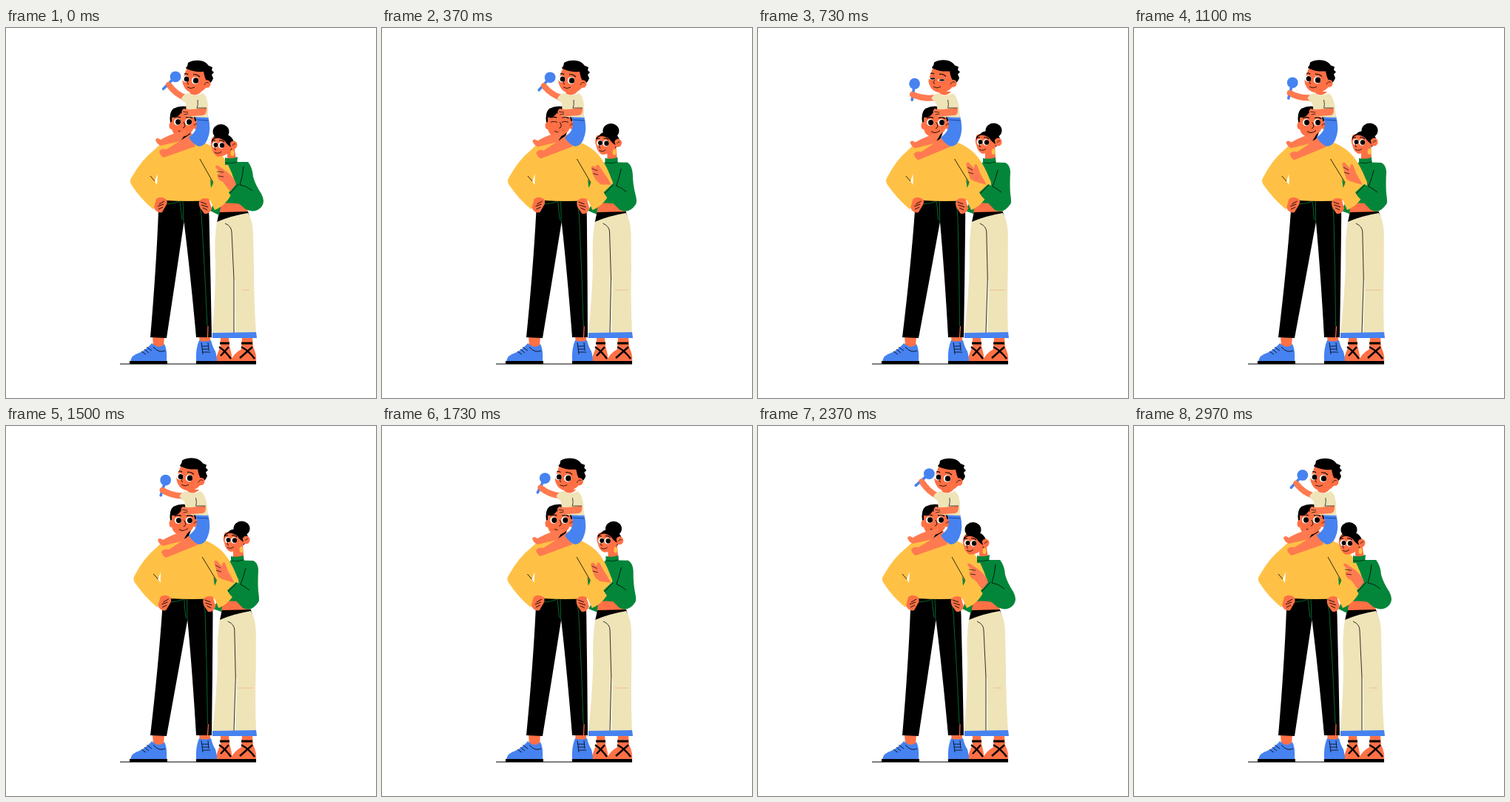
Write an HTML page with a canvas that moves like this. It is 500x500 px and loops after 3 s.

```html
<!DOCTYPE html>
<html lang="en">
<head>
<meta charset="utf-8">
<title>Family</title>
<style>
html, body { margin: 0; width: 100%; height: 100%; overflow: hidden; background: #fff; }
canvas { display: block; width: 500px; height: 500px; }
</style>
</head>
<body>
<canvas id="stage" width="500" height="500"></canvas>
<script>
const ctx = document.getElementById('stage').getContext('2d');
const SKIN = '#ff7045', LIMB = '#ff7a50', YELLOW = '#ffc145', BLUE = '#4682f0', GREEN = '#03863a',
      CREAM = '#efe4b8', BLACK = '#000', WHITE = '#fff';
const LOOP = 3000;

const clamp = v => Math.max(0, Math.min(1, v));
const ease = (t, a, b) => { const p = clamp((t - a) / (b - a)); return p * p * (3 - 2 * p); };
const hold = (t, a, b, c, d) => ease(t, a, b) - ease(t, c, d);
const lerp = (a, b, k) => a + (b - a) * k;

// Blend two paths that share the same commands.
function mix(a, b, k) {
  const to = b.match(/[\d.]+/g);
  let i = 0;
  return a.replace(/[\d.]+/g, n => lerp(+n, +to[i++], k));
}

// The current pose moves every point of the shapes drawn with it.
const still = (x, y) => [x, y];
let pose = still;
const place = d => new Path2D(d.replace(/([\d.]+) ([\d.]+)/g, (_, x, y) => pose(+x, +y).join(' ')));

function fill(color, d) {
  ctx.fillStyle = color;
  ctx.fill(place(d));
}
function line(d, width = 0.8, color = BLACK) {
  ctx.strokeStyle = color;
  ctx.lineWidth = width;
  ctx.stroke(place(d));
}
function oval(color, x, y, rx, ry = rx, turn = 0) {
  [x, y] = pose(x, y);
  ctx.fillStyle = color;
  ctx.beginPath();
  ctx.ellipse(x, y, rx, ry, turn, 0, 7);
  ctx.fill();
}
function eye(x, y, r, open) {
  if (open < 0.15) return line(`M${x - r} ${y} Q${x} ${y - 2} ${x + r} ${y}`);
  oval(WHITE, x - 0.4, y, r, r * open);
  oval(BLACK, x + 0.5, y, r * 0.76, r * 0.8 * open);
}

function feet() {
  pose = still;
  line('M154 454 L338 454', 1);
  fill(SKIN, 'M290 418 L301 418 L302 430 Q306 442 305 451 L283 451 Q285 440 290 430Z');
  fill(SKIN, 'M319 418 L333 418 L334 431 Q339 441 338 451 L303 451 Q307 440 318 434Z');
  line('M289 426 L302 426 M318 426 L333 426', 3);
  line('M288 431 Q296 436 304 447 M301 431 L290 443 M318 431 Q328 436 336 447 M333 431 L316 446', 2.4);
  fill(BLACK, 'M284 450 L338 450 L338 454 L284 454Z');
  fill(SKIN, 'M198 416 L214 416 L213 431 L199 431Z M261 416 L276 416 L276 428 L262 428Z');
  fill(BLUE, 'M168 451 Q169 442 180 439 Q189 435 197 426 Q207 435 214 427 Q218 434 217 451Z');
  fill(BLUE, 'M257 451 Q256 433 261 422 Q268 425 277 422 Q279 431 283 437 Q285 443 285 451Z');
  line('M187 434 L193 439 M190 431 L197 436 M183 437 L189 441 M199 431 Q207 440 215 436', 0.8);
  line('M264 425 L266 441 M273 425 L274 436 M265 430 L273 430 M265 434 L274 434 M266 438 L276 438', 0.8);
  fill(BLACK, 'M167 450 L218 450 L218 454 L167 454Z M257 450 L285 450 L285 454 L257 454Z');
}

function womanBody(w) {
  pose = (x, y) => [x + 3.8 * w * clamp((412 - y) / 120), y];
  fill(SKIN, 'M288 230 L325 230 L327 252 L287 252Z');
  fill(BLACK, 'M288 249 L327 248 L329 255 L285 263Z');
  fill(CREAM, 'M285 262 Q303 254 327 250 Q334 261 334 280 L335 325 Q335 370 338 413 L279 413 Q283 360 283 320 Q281 285 285 262Z');
  line('M309 340 L309.5 412', 1.2, WHITE);
  line('M296 264 Q305 268 305 276 L308 340 L308 412');
  line(mix('M318 354 L329 354', 'M311 354 L333 354', w), 0.7, '#f3ae86');
  fill(BLUE, 'M279 412 L338 411 L339 419 L279 419Z');
  pose = still;
  fill(GREEN, mix(
    'M296 181 L327 181 Q333 195 330 215 L327 240 Q308 235 291 237 L288 253 L276 247 L286 226 L274 205Z',
    'M304 181 L334 182 Q339 195 337 215 L330 240 Q312 235 293 237 L291 251 L280 247 L290 228 L284 205Z', w));
}

function womanHead(w) {
  pose = (x, y) => [x + 17 * w, y - 4 * w];
  fill(SKIN, mix('M299 162 L308 158 L311 178 L299 178Z', 'M290 162 L303 162 L304 181 L290 181Z', w));
  fill(BLACK, mix(
    'M278 150 Q284 141 294 143 Q306 144 309 157 L304 165 L290 156Z',
    'M282 150 Q284 143 295 143 Q308 143 311 157 L304 165 L290 156Z', w));
  oval(BLACK, 290.5 + 11 * w, 140 + 2.5 * w, 11, 10);
  fill(SKIN, 'M279 148 Q275 156 278 162 Q280 172 287 174 Q300 173 305 162 L301 153 Q292 150 288 146Z');
  oval(SKIN, 307.5, 158, 5, 5.5);
  line('M306 159 Q308 155 310 157', 0.7);
  oval(YELLOW, 306 - 5 * w, 169 + 2 * w, 2.4, 4);
  fill(BLACK, 'M278 151 Q286 144 292 145 Q302 148 304 161 Q298 157 296 153 Q289 148 284 149 Q279 150 278 156Z');
  eye(283, 158, 3.9, 1);
  eye(291.5, 158.5, 4.2, 1);
  line('M278 152 L283 152 M288 152 Q292 151 295 154', 1.1);
  line('M284 159 Q280 164 284 165 M282 168 Q287 171 291 167', 0.8);
  pose = still;
  fill(GREEN, mix('M296 175 Q303 178 313 174 L312 185 L296 185Z', 'M304 176 Q312 178 321 175 L322 185 L304 185Z', w));
  line(mix('M296 182 Q304 184 312 181', 'M305 182 Q313 184 321 181', w), 0.6);
}

function womanArm(w) {
  fill(GREEN, mix(
    'M309 183 L327 181 Q333 188 334 201 Q337 212 345 224 Q351 235 345 242 Q337 251 324 245 L305 229 L301 222 L312 210 L318 214Z',
    'M315 183 L334 182 Q340 184 341 194 Q340 212 341 224 Q343 237 341 238 Q332 252 320 246 L302 227 L299 222 L311 211 L317 214Z', w));
  line(mix('M321 187 Q320 200 316 212 Q325 213 333 220', 'M324 192 Q321 204 317 214 Q323 217 329 222', w));
  line(mix('M302 224 L314 211', 'M300 224 L312 212', w));
  fill(LIMB, mix(
    'M311 211 Q307 200 298 194 L288 187 Q283 184 283 188 L290 196 Q284 196 286 201 Q287 206 293 208 L303 221Z',
    'M309 212 Q304 203 300 196 L296 185 Q292 182 292 190 L285 182 Q280 181 282 187 L285 198 Q287 204 292 207 L300 220Z', w));
  line(mix('M285 194 L294 195 M287 200 L294 201', 'M283 188 L290 192 M284 195 L291 197', w), 0.7);
}

function manBody(m) {
  pose = (x, y) => [x + 6.5 * m * (y < 232 ? clamp((y - 110) / 122) : clamp((418 - y) / 186)), y];
  fill(BLACK, 'M215 231 L273 231 L274.5 255 L276.5 340 L278 418 L257 418 Q249 330 240.5 262 Q229 340 217 419 L195 418 Q203 325 206 248Z');
  const stitch = '#07642e';
  line('M217 238 Q227 237 233 235 L233 232 M235 234 L238 259 M239 234 L240 262 M261 234 L264 252 Q269 330 272 403', 1, stitch);
  line('M273 403 L272.5 418', 1.2, SKIN);
  fill(YELLOW, 'M230 149 Q212 152 200 165 Q183 178 169 203 Q166 208 171 214 Q182 231 199 245 L206 232 L216 233 Q246 235 276 233 L282 246 Q300 239 309 215 Q311 209 308 204 Q298 174 282 163 Q270 154 254 151Z');
  fill(WHITE, 'M205 197 L201 207 L204 212Z');
  fill(GREEN, 'M276 204 L280 210 L277 216Z');
  line('M195 200 L201 207 M262 177 L280 209');
  fill(SKIN, 'M203 231 Q210 226 217 232 Q219 236 215 242 L211 249 Q204 251 200 243Z');
  fill(SKIN, 'M274 231 Q266 228 262 233 Q259 238 263 244 L268 251 Q275 252 278 244Z');
  line('M207 238 L214 234 M205 241 L213 238 M206 245 L212 242 M271 238 L263 235 M273 242 L264 239 M272 246 L266 243', 0.9);
}

function manHead(m, open) {
  pose = still;
  fill(BLACK, 'M231 144 L250 141 L246 151 Q240 154 232 151Z');
  fill(BLACK, 'M222 128 Q220 114 226 109 Q238 103 251 108 Q258 113 257 127Z');
  oval(SKIN, 223.5, 132, 3, 5);
  oval(SKIN, 255.5, 131, 4, 5.5);
  fill(SKIN, 'M224 121 Q233 121 236 115 Q246 122 254 120 Q257 130 252 139 Q246 146 238 147 Q226 147 224 136Z');
  pose = (x, y) => [x + m, y + 0.7 * m];
  eye(232, 127, 4.6, open);
  eye(247, 127, 4.6, open);
  line('M227 121 Q232 119 236 121 M243 121 Q248 119 252 122', 1.2);
  line('M240 127 Q244 134 239 135 M233 139 Q239 143 245 138', 0.9);
  pose = still;
  line('M254 132 Q256 128 258 130', 0.7);
}

function kid(k, m, arm, open) {
  // Raised arm and microphone
  const hand = [lerp(221, 210, arm), lerp(76, 89, arm)];
  const ball = [lerp(230.5, 213, arm), lerp(65, 74.5, arm)];
  const tail = [lerp(213, 208.5, arm), lerp(81, 96, arm)];
  pose = (x, y) => [x + 3.5 * m, y + 3.5 * m * clamp((265 - x) / 40)];
  fill(LIMB, 'M246 137 L229 142 Q217 146 209 151 Q204 147 202 151 Q203 156 209 159 L236 153Z');
  fill(LIMB, 'M251 142 L233 154 L217 164 Q210 162 207 167 Q208 172 213 175 L256 160Z');
  pose = still;
  fill(BLUE, 'M255 118 L273 119 Q278 138 272 151 Q268 160 260 160 Q252 156 247 148 Q259 139 258 128Z');
  line('M258 124 L274 125', 0.9, '#173f91');
  pose = (x, y) => [x - 3 * k * clamp((122 - y) / 30), y];
  const shoulder = pose(242, 94);
  fill(CREAM, 'M246 88 Q256 94 266 88 Q272 92 273 105 L273 121 L244 120 L243 101 L238 98 Q240 90 246 88Z');
  fill(SKIN, 'M248 86 L264 86 Q258 93 249 89Z');
  fill(LIMB, 'M271 106 Q272 117 266 118 L252 119 Q243 121 238 117 Q236 112 240 109 Q247 111 259 109Z');
  fill(CREAM, 'M258 92 L268 90 Q273 97 272 108 L258 109Z');
  line('M259 97 Q260 104 258 108 L271 108 M239 113 L246 114 M240 117 L246 116', 0.7);
  pose = still;
  ctx.lineCap = 'round';
  line(`M${shoulder.join(' ')} Q${lerp(231, 225, arm)} ${lerp(90, 96, arm)} ${hand.join(' ')}`, 8, LIMB);
  line(`M${tail.join(' ')} L${ball.join(' ')}`, 3.6, BLUE);
  ctx.lineCap = 'butt';
  oval(BLUE, ...ball, 7.4);
  oval(LIMB, ...hand, 3.6, 4.4, -0.5);
  pose = (x, y) => [x - 3 * k * clamp((122 - y) / 30), y];
  fill(CREAM, 'M247 88 Q240 89 237 95 L243 102 L249 96Z');

  pose = (x, y) => [x - 8 * k, y - 0.6 * k];
  fill(BLACK, 'M243 54 Q246 51 246 47 Q253 43 262 44 Q270 45 274 51 L279 53 L278 57 L281 60 L278 63 L280 68 Q278 74 273 76 L252 65Z');
  fill(SKIN, 'M244 55 Q254 60 267 59 Q268 66 271 72 L271 80 Q263 89 253 88 Q243 86 240 78 Q237 72 240 66Z');
  oval(SKIN, 271.5, 75.5, 5, 5.2);
  line('M268 77 Q270 72 274 74', 0.7);
  eye(243.5, 69, 4.4, open);
  eye(256, 71, 4.8, open);
  line('M241 62 Q244 61 246 63 M253 63 Q258 62 262 66', 1.1);
  line('M247 71 Q243 75 247 76 M245 80 Q250 83 255 80', 0.8);
}

const blink = (t, mid, half) => clamp(Math.abs(t - mid) / half);

function draw(t) {
  const woman = hold(t, 0, 600, 1560, 2160);
  const man = hold(t, 100, 720, 1380, 1930);
  const child = hold(t, 400, 700, 1550, 1960);
  const wave = 0.2 * Math.cos(2 * Math.PI * (7 * t / LOOP - 0.32));
  ctx.fillStyle = WHITE;
  ctx.fillRect(0, 0, 500, 500);
  feet();
  womanBody(woman);
  manBody(man);
  womanHead(woman);
  manHead(man, blink(t, 370, 110));
  kid(child, man, 0.93 * child - wave, Math.max(0.3, blink(t, 740, 120)));
  pose = still;
  womanArm(woman);
}

function frame(now) {
  draw(now % LOOP);
  requestAnimationFrame(frame);
}
draw(0);
requestAnimationFrame(frame);
</script>
</body>
</html>
```
